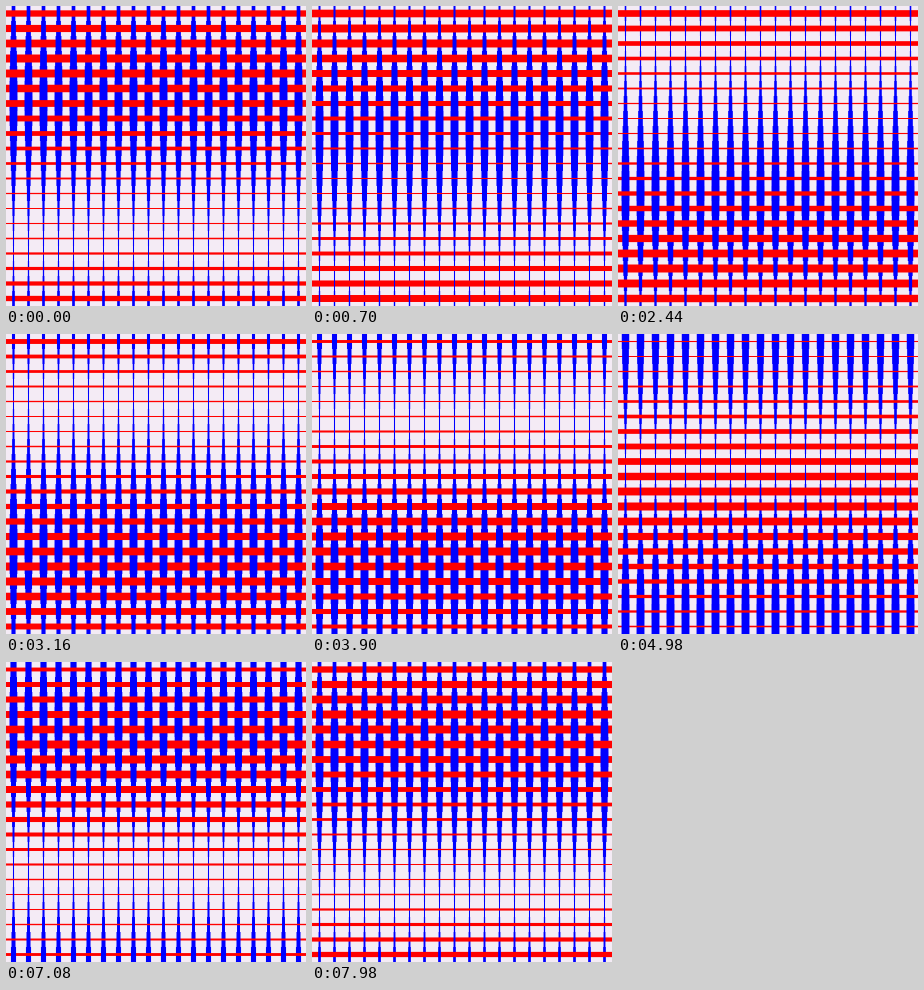
Write an HTML page with a canvas that moves like this. It is 300x300 px and loops after 8 s.

```html
<!DOCTYPE html>
<html lang="en">
<head>
<meta charset="utf-8">
<title>Weave</title>
<style>
  html, body { margin: 0; width: 100%; height: 100%; overflow: hidden; background: #f4ebf5; }
  canvas { display: block; width: 300px; height: 300px; }
</style>
</head>
<body>
<canvas id="stage" width="300" height="300"></canvas>
<script>
const ctx = document.getElementById('stage').getContext('2d');
const SIZE = 300, CELL = 15, COUNT = SIZE / CELL, LOOP = 8000, STEP = 20;
const RED = '#ff0000', BLUE = '#0000ff', PAPER = '#f4ebf5';

// Thread width at height y for a wave whose crest sits at `crest`.
const threadWidth = (y, crest) =>
  4.5 + 3.5 * Math.cos(2 * Math.PI * (y - crest) / SIZE);

function across(x, y, width) {
  ctx.fillStyle = RED;
  ctx.fillRect(x, y - width / 2, CELL, width);
}

function down(x, y, width) {
  ctx.fillStyle = BLUE;
  ctx.fillRect(x - width / 2, y, width, CELL);
}

function draw(t) {
  const shift = SIZE * t / LOOP;
  ctx.fillStyle = PAPER;
  ctx.fillRect(0, 0, SIZE, SIZE);
  for (let row = 0; row < COUNT; row++) {
    const top = row * CELL, mid = top + CELL / 2;
    const redWidth = threadWidth(mid, 56.25 - shift);
    const blueWidth = threadWidth(mid, 93.75 + shift);
    for (let col = 0; col < COUNT; col++) {
      const left = col * CELL, center = left + CELL / 2;
      const redOnTop = (row + col) % 2 === 0;
      if (!redOnTop) across(left, mid, redWidth);
      down(center, top, blueWidth);
      if (redOnTop) across(left, mid, redWidth);
    }
  }
}

function frame() {
  const t = performance.now() % LOOP;
  draw(Math.floor(t / STEP) * STEP);
  requestAnimationFrame(frame);
}
frame();
</script>
</body>
</html>
```
